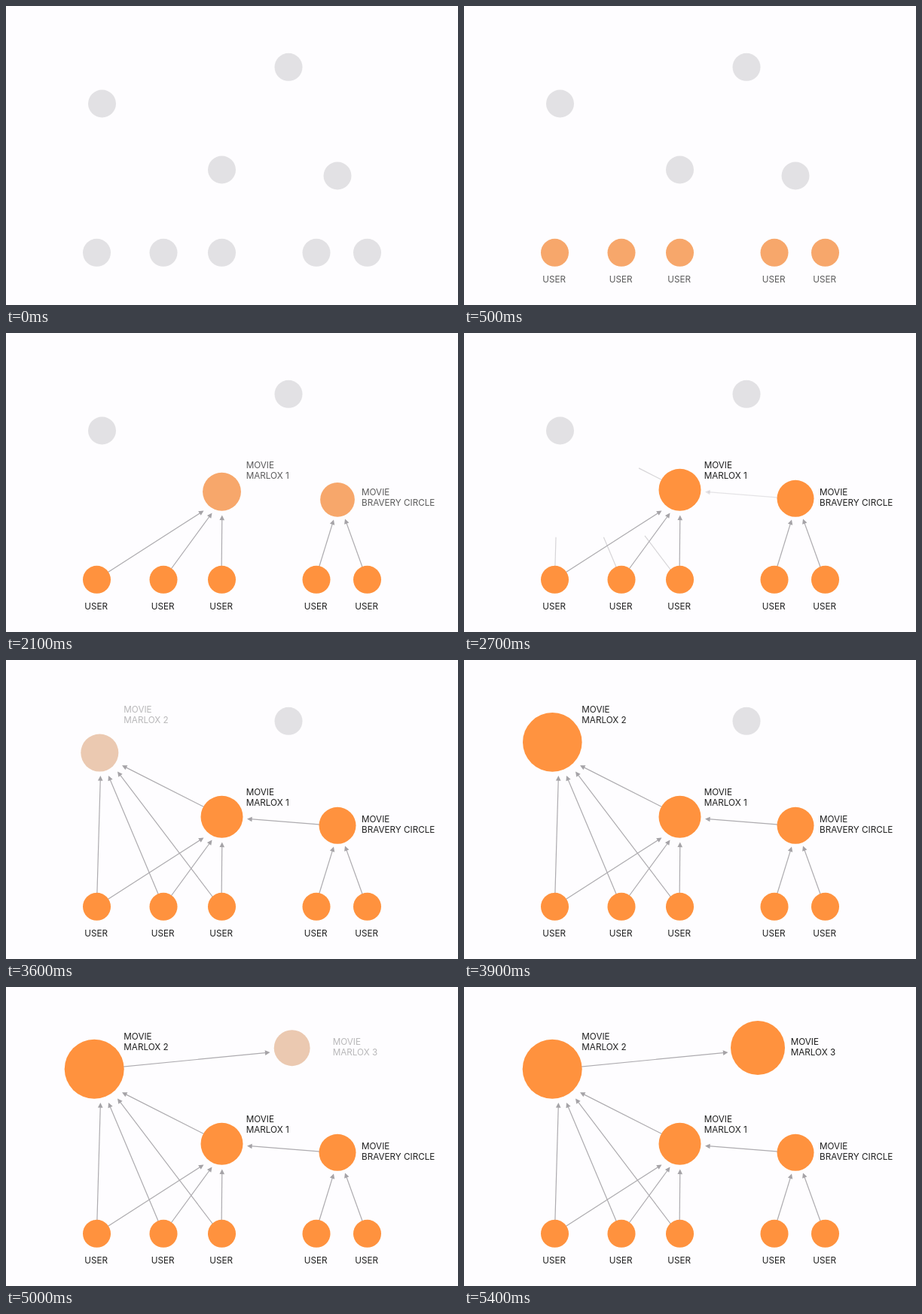
An HTML page that plays this animation: 600 px wide and 398 px high, repeating every 6700 ms.

```html
<!DOCTYPE html>
<html lang="en">
<head>
<meta charset="utf-8">
<title>Movie graph</title>
<style>
  html, body { margin: 0; width: 100%; height: 100%; overflow: hidden; background: #fefdff; }
  svg { display: block; width: 600px; height: 398px; }
  text { font: 400 11.7px Inter, "Liberation Sans", sans-serif; fill: #1f1f1f; }
  line { stroke: #adabaf; stroke-width: 1.2; }
  polygon { fill: #a5a3a7; }
</style>
</head>
<body>
<svg id="stage" viewBox="0 0 600 398"></svg>
<script>
const LOOP = 6700, STEP = 100, DOT = 18.5;
const EASE = [0.31, 0.73, 0.94, 0.99, 1];   // ease-out, one value per step
const GREY = [226, 225, 228], ORANGE = [255, 146, 62];

const USERS = [120.5, 209, 286.5, 412, 479.5];

// from: [x, y], to: [x, y, r], label: [x, baseline]
const MOVIES = [
  { at: 2000, from: [286.5, 218], to: [286.5, 208.8, 28], label: [318.7, 180], name: "MARLOX 1" },
  { at: 2000, from: [440, 226], to: [440, 220.3, 24.5], label: [472, 216], name: "BRAVERY CIRCLE" },
  { at: 3600, from: [127.5, 130], to: [117.2, 109.2, 39.5], label: [156.3, 70], name: "MARLOX 2" },
  { at: 5000, from: [375, 81.3], to: [390, 81, 36], label: [433.7, 77], name: "MARLOX 3" },
];

// begin: share of the length already there when the arrow starts growing
const ARROWS = [
  { at: 1300, pts: [120.5, 328, 262.5, 236.5] },
  { at: 1300, pts: [209, 328, 273.5, 239.5] },
  { at: 1300, pts: [286, 328, 286.8, 242.5] },
  { at: 1300, pts: [410.5, 328, 435, 248.5] },
  { at: 1300, pts: [479, 328, 450, 247.5] },
  { at: 2700, pts: [120.4, 328, 125.4, 154] },
  { at: 2700, pts: [209, 328, 136, 154] },
  { at: 2700, pts: [284, 328, 148, 148.5] },
  { at: 2700, pts: [287, 207.8, 154, 140.3], begin: 0.15 },
  { at: 2700, pts: [440, 220.8, 320, 211.4], fade: true },
  { at: 4300, pts: [117, 109.9, 350.5, 87], begin: 0.17 },
];

const stage = document.getElementById("stage");
const lerp = (a, b, p) => a + (b - a) * p;

function set(el, attrs) {
  for (const key in attrs) el.setAttribute(key, attrs[key]);
}

function add(tag, attrs, text) {
  const el = document.createElementNS("http://www.w3.org/2000/svg", tag);
  set(el, attrs);
  if (text) el.textContent = text;
  return stage.appendChild(el);
}

function progress(t, at) {
  if (t < at) return 0;
  return EASE[Math.min(Math.floor((t - at) / STEP), EASE.length - 1)];
}

const tint = p => `rgb(${GREY.map((c, i) => Math.round(lerp(c, ORANGE[i], p)))})`;

function makeArrow({ at, pts: [x1, y1, x2, y2], begin = 0.02, fade }) {
  const line = add("line", { x1, y1 });
  const head = add("polygon", { points: "0,0 -6.6,-3.3 -6.6,3.3" });
  const angle = Math.atan2(y2 - y1, x2 - x1);
  const turn = angle * 180 / Math.PI;
  return t => {
    const p = progress(t, at);
    const reach = fade ? 1 : lerp(begin, 1, p);
    const x = lerp(x1, x2, reach), y = lerp(y1, y2, reach);
    const inset = p > 0.5 || fade ? 4 : 0;
    set(line, {
      x2: x - inset * Math.cos(angle),
      y2: y - inset * Math.sin(angle),
      opacity: p && (fade ? p : lerp(0.25, 1, p)),
    });
    set(head, {
      transform: `translate(${x} ${y}) rotate(${turn})`,
      opacity: fade || p > 0.5 ? p : 0,
    });
  };
}

function makeUser(cx) {
  const dot = add("circle", { cx, cy: 328.3, r: DOT });
  const label = add("text", { x: cx - 0.9, y: 368, "text-anchor": "middle" }, "USER");
  return t => {
    const p = progress(t, 400);
    set(dot, { fill: tint(p) });
    set(label, { opacity: p });
  };
}

function makeMovie({ at, from, to, label: [x, y], name }) {
  const dot = add("circle", {});
  const labels = ["MOVIE", name].map((text, i) => add("text", { x, y: y + i * 14 }, text));
  return t => {
    const p = progress(t, at);
    set(dot, {
      cx: lerp(from[0], to[0], p),
      cy: lerp(from[1], to[1], p),
      r: lerp(DOT, to[2], p),
      fill: tint(p),
    });
    labels.forEach(el => set(el, { opacity: p }));
  };
}

const parts = [...ARROWS.map(makeArrow), ...USERS.map(makeUser), ...MOVIES.map(makeMovie)];
const start = performance.now();

function draw() {
  const t = (performance.now() - start) % LOOP;
  parts.forEach(update => update(t));
  requestAnimationFrame(draw);
}
draw();
</script>
</body>
</html>
```
